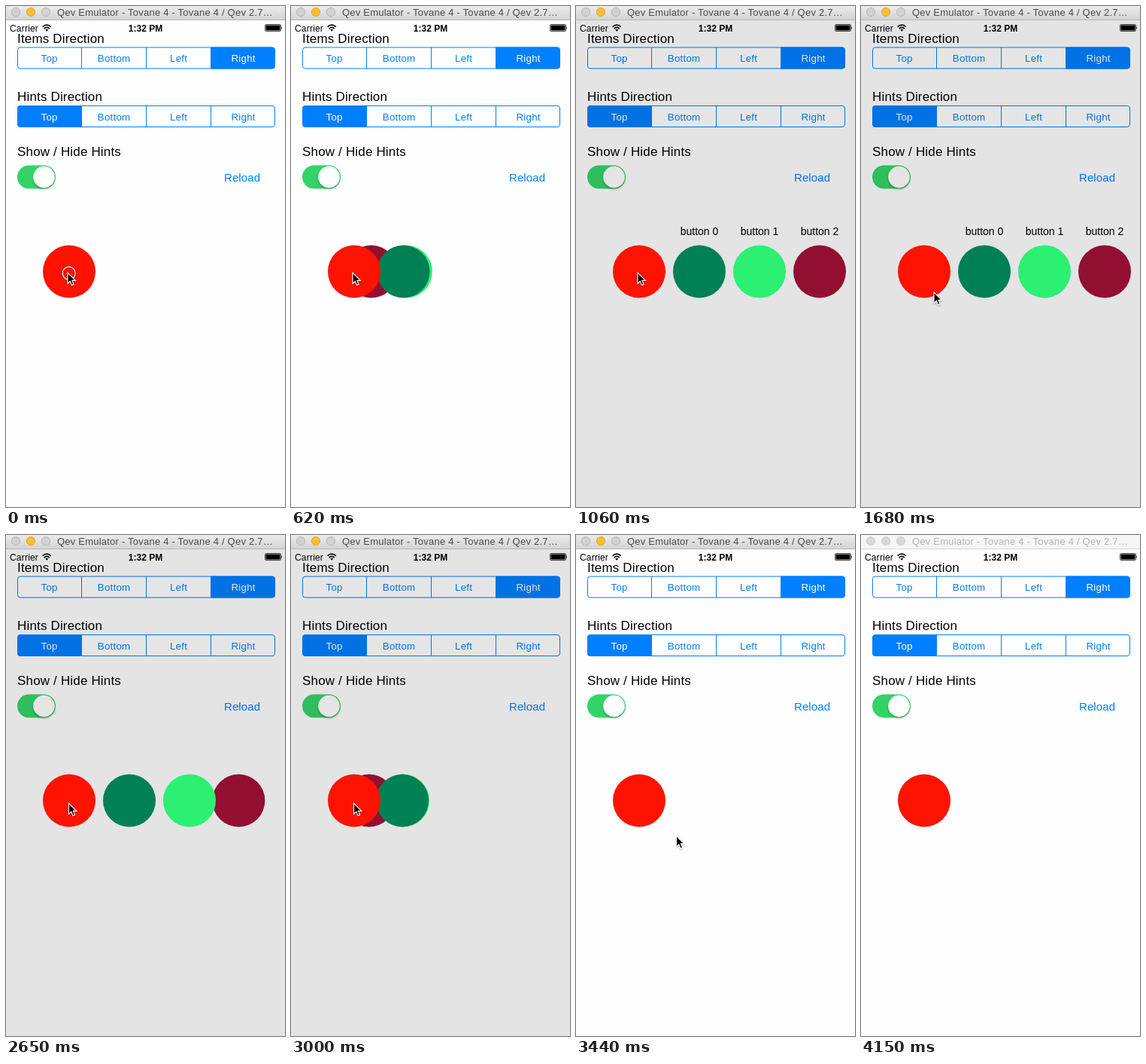
An HTML page that plays this animation: 371 by 665 pixels, repeating every 4250 ms.

```html
<!DOCTYPE html>
<html lang="en">
<head>
<meta charset="utf-8">
<title>Bubble menu</title>
<style>
  html, body { margin: 0; width: 100%; height: 100%; overflow: hidden; background: #fff; }
  svg { display: block; width: 371px; height: 665px; font-family: "Liberation Sans", Arial, sans-serif; }
  .label { font-size: 17px; letter-spacing: .17px; }
  .seg text { font-size: 13.3px; letter-spacing: .25px; text-anchor: middle; }
  .hint { font-size: 14px; text-anchor: middle; }
  #title { font-size: 13px; letter-spacing: .22px; }
</style>
</head>
<body>
<svg viewBox="0 0 371 665">
  <defs>
    <linearGradient id="chrome" x2="0" y2="1">
      <stop stop-color="#ebebeb"/><stop offset="1" stop-color="#d3d3d3"/>
    </linearGradient>
    <filter id="soft" x="-30%" y="-30%" width="160%" height="170%">
      <feDropShadow dx="0" dy="2" stdDeviation="1.5" flood-opacity=".3"/>
    </filter>
    <filter id="faint" x="-30%" y="-30%" width="170%" height="170%">
      <feDropShadow dx="0" dy="1" stdDeviation=".8" flood-opacity=".35"/>
    </filter>
  </defs>
  <rect width="371" height="665" fill="#fefefe"/>

  <g id="status">
    <text x="5" y="34" font-size="12" letter-spacing=".2">Carrier</text>
    <g fill="none" stroke="#000" stroke-width="1.7">
      <path d="M48.6 27.6Q54.2 22.6 59.8 27.6M50.7 30Q54.2 26.9 57.7 30"/>
      <path d="M52.2 31.6Q54.2 29.9 56.2 31.6L54.2 33.8Z" fill="#000" stroke="none"/>
    </g>
    <text x="185.5" y="34" font-size="12" font-weight="bold" text-anchor="middle">1:32 PM</text>
    <rect x="344.5" y="24.5" width="21" height="9" rx="1.5" fill="none" stroke="#000" stroke-width=".7"/>
    <rect x="345.5" y="25.5" width="19" height="7" rx=".7"/>
    <path d="M366.3 27.3Q368 29 366.3 30.7Z"/>
  </g>

  <text class="label" x="15" y="49">Items Direction</text>
  <text class="label" x="15" y="125.5">Hints Direction</text>
  <text class="label" x="15" y="199">Show / Hide Hints</text>
  <g id="segments"></g>
  <rect x="15" y="211.5" width="51" height="31" rx="15.5" fill="#33d467"/>
  <circle cx="50.5" cy="227" r="14.3" fill="#fff" filter="url(#soft)"/>
  <text x="290" y="232.5" font-size="15" letter-spacing=".1" fill="#007fff">Reload</text>

  <rect id="dim" y="19" width="371" height="646" opacity=".1"/>
  <g id="hints"></g>
  <g id="items"></g>
  <circle cx="84" cy="352.5" r="35" fill="#ff1300"/>

  <g id="cursor">
    <g id="ring" fill="none">
      <circle cx="1.7" cy=".7" r="9.4" stroke="#444" stroke-width="1"/>
      <circle cx="1.7" cy=".7" r="8.5" stroke="#fff" stroke-width="1.2"/>
    </g>
    <path d="M0 0V14.4L3.3 11.3L5.6 16.6L8.1 15.5L5.8 10.4H10.3Z" stroke="#fff" stroke-width="1.1" filter="url(#faint)"/>
  </g>

  <rect id="bar" width="371" height="19"/>
  <path id="barLine" d="M0 18.5H371"/>
  <g id="lights"></g>
  <text id="title" x="68" y="13">Qev Emulator - Tovane 4 - Tovane 4 / Qev 2.7…</text>
</svg>
<script>
const $ = id => document.getElementById(id);
const set = (el, attrs) => {
  for (const k in attrs) el.setAttribute(k, attrs[k]);
  return el;
};
const add = (parent, tag, attrs, text = '') => {
  const el = set(document.createElementNS('http://www.w3.org/2000/svg', tag), attrs);
  el.textContent = text;
  return parent.appendChild(el);
};
const show = (el, on) => set(el, { visibility: on ? 'visible' : 'hidden' });

const BLUE = '#007fff', HOME = 84, GAP = 80;

function segmented(y, selected) {
  const g = add($('segments'), 'g', { class: 'seg' });
  add(g, 'rect', { x: 15.5, y, width: 342, height: 28, rx: 3.5, fill: '#fff', stroke: BLUE });
  add(g, 'path', {
    d: selected ? `M272.5 ${y}h81.5q3.5 0 3.5 3.5v21q0 3.5 -3.5 3.5h-81.5z`
                : `M100.5 ${y}h-81.5q-3.5 0 -3.5 3.5v21q0 3.5 3.5 3.5h81.5z`,
    fill: BLUE, stroke: BLUE
  });
  ['Top', 'Bottom', 'Left', 'Right'].forEach((name, i) => {
    if (i) add(g, 'path', { d: `M${14.5 + 86 * i} ${y}v28`, stroke: BLUE });
    add(g, 'text', { x: 57.6 + 86 * i, y: y + 19, fill: i === selected ? '#fff' : BLUE }, name);
  });
}
segmented(55, 3);
segmented(132.5, 0);

const items = ['#930f32', '#2cf072', '#008055'].map(fill =>
  add($('items'), 'circle', { cy: 352.5, r: 35, fill })).reverse();
items.forEach((_, i) =>
  add($('hints'), 'text', { class: 'hint', x: HOME + GAP * (i + 1), y: 304 }, 'button ' + i));
const lights = [13, 33, 53].map(cx => add($('lights'), 'circle', { cx, cy: 8, r: 5.6 }));

// Ease-in-out: cubic-bezier(.42, 0, .58, 1)
function ease(t) {
  if (t <= 0) return 0;
  if (t >= 1) return 1;
  let lo = 0, hi = 1, s;
  for (let i = 0; i < 20; i++) {
    s = (lo + hi) / 2;
    if (s * (1.26 + s * (.52 * s - .78)) < t) lo = s; else hi = s;
  }
  return s * s * (3 - 2 * s);
}

const OPEN = 226, CLOSE = 2553, STAGGER = 137, MOVE = 559;
const reach = (i, t) => ease((t - OPEN - i * STAGGER) / MOVE)
                      - ease((t - CLOSE - (2 - i) * STAGGER) / MOVE);

// Pointer waypoints: time, x, y
const path = [
  [0, 82, 354], [1590, 82, 354], [1680, 97, 380], [1770, 106, 428], [1860, 109, 455],
  [1950, 109, 455], [2040, 105, 438], [2120, 91, 385], [2210, 83.5, 356],
  [3350, 83.5, 356], [3440, 133.5, 399.5], [4250, 133.5, 399.5]
];
function pointer(t) {
  const i = path.findIndex(p => p[0] > t);
  const [t0, x0, y0] = path[i - 1], [t1, x1, y1] = path[i];
  const k = (t - t0) / (t1 - t0);
  return [x0 + (x1 - x0) * k, y0 + (y1 - y0) * k];
}

// The screen refreshes every 90 ms, with a few shorter ticks
const LOOP = 4250, SHORT = [0, 8, 16, 24, 29, 32, 37, 43], ticks = [0];
for (let i = 0; i < 47; i++) ticks.push(ticks[i] + (SHORT.includes(i) ? 80 : 90));

function draw(t) {
  items.forEach((el, i) => {
    const d = reach(i, t) * GAP * (i + 1);
    show(set(el, { cx: HOME + d }), d > .01);
  });
  show($('dim'), t >= 1060 && t < 3440);
  show($('hints'), t >= 1060 && t < 2480);
  set($('cursor'), { transform: `translate(${pointer(t)})` });
  set($('cursor'), { display: t < 3530 ? 'inline' : 'none' });
  set($('ring'), { display: t < 80 || t >= 2390 && t < 2480 ? 'inline' : 'none' });

  const active = t < 4150;
  set($('bar'), { fill: active ? 'url(#chrome)' : '#f6f6f6' });
  set($('barLine'), { stroke: active ? '#b8b8b8' : '#d8d8d8' });
  set($('title'), { fill: active ? '#4a4a4a' : '#b3b3b3' });
  lights.forEach((el, i) => set(el, active && i === 1
    ? { fill: '#fdbe2e', stroke: '#dfa12c' }
    : { fill: active ? '#d2d2d2' : '#d8d8d8', stroke: active ? '#b5b5b5' : '#cecece' }));
}

const start = performance.now();
function frame() {
  const t = (performance.now() - start) % LOOP;
  draw(ticks.filter(k => k <= t).pop());
  requestAnimationFrame(frame);
}
frame();
</script>
</body>
</html>
```
